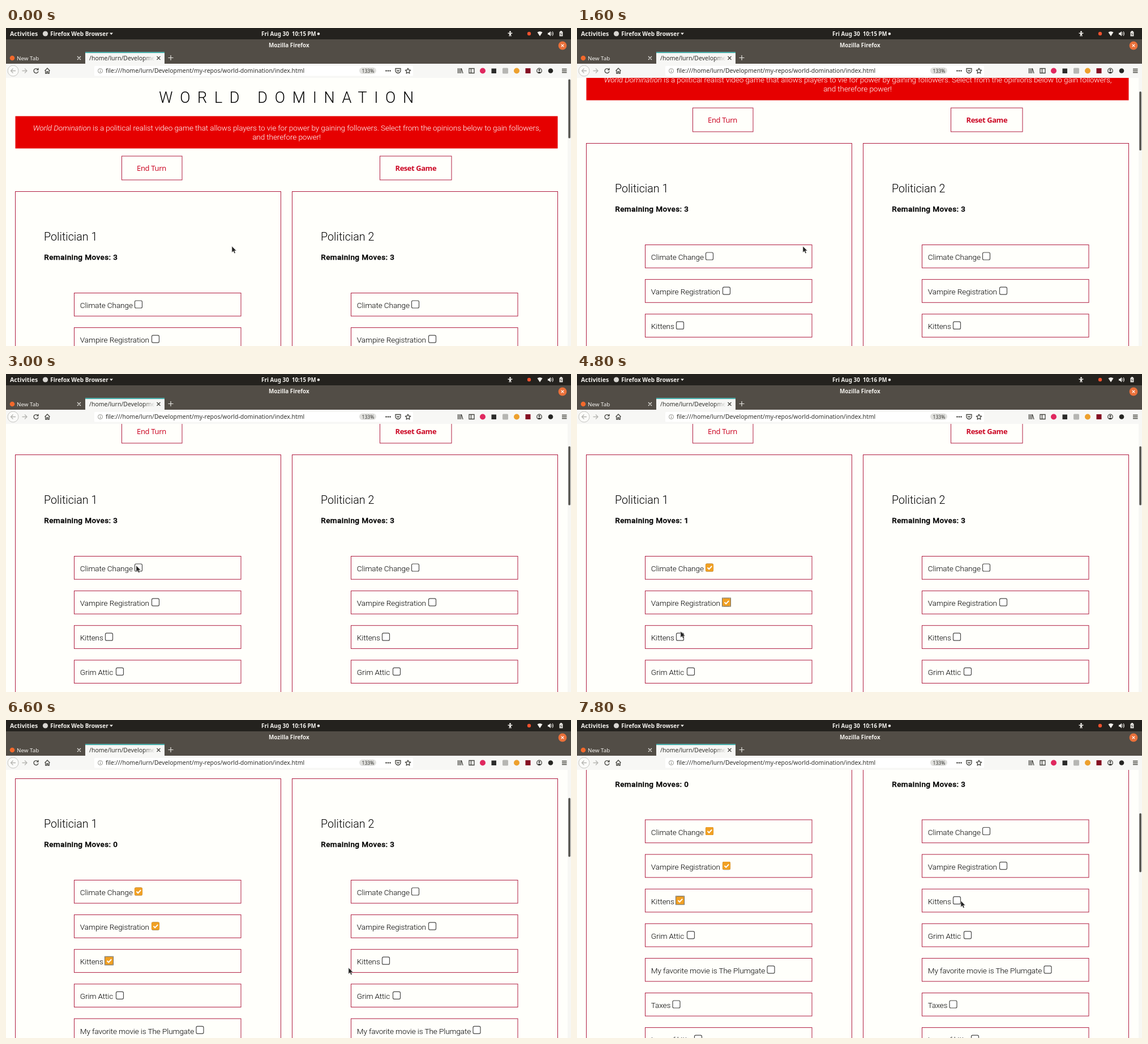
Recreate the animation shown at these times as an HTML page. Size 998 px wide and 561 px high, loop 8000 ms.

```html
<!DOCTYPE html>
<html lang="en">
<head>
<meta charset="utf-8">
<title>World Domination</title>
<style>
  @property --scroll { syntax: "<number>"; inherits: true; initial-value: 0; }
  @property --picked { syntax: "<number>"; inherits: true; initial-value: 0; }
  @property --minute { syntax: "<number>"; inherits: true; initial-value: 0; }

  html, body { margin: 0; width: 100%; height: 100%; overflow: hidden; background: #fffffb; }
  svg { display: block; animation: scroll 8s step-end infinite, state 8s step-end infinite; }
  text { white-space: pre; }

  #page { font-family: Roboto, sans-serif; font-size: 13.64px; font-weight: 300; letter-spacing: -.13px;
          fill: #000; transform: translateY(calc(var(--scroll) * -1px)); }
  #thumb { transform: translateY(calc(var(--scroll) * .2535px)); }
  #chrome { font: 10.5px "Noto Sans", "Open Sans", sans-serif; fill: #33332f; }
  .title { font-size: 27px; letter-spacing: 12.65px; }
  .name { font-size: 19.7px; letter-spacing: 0; }
  .moves { font-weight: 500; letter-spacing: .36px; stroke: #000; stroke-width: .3px; }
  .button { font: 500 13px "Noto Sans", "Open Sans", sans-serif; letter-spacing: -.35px; fill: #cc0a26; }
  .strong { font-weight: 700; letter-spacing: -.45px; }
  .frame { fill: none; stroke: #b01c40; }
  .light { fill: #f2f0ec; font-weight: 600; }
  .line { fill: none; stroke: #44443f; stroke-width: 1.3; }
  .faint { stroke: #b5b5b1; }

  /* --k is the number of picks at which an item appears */
  .from { opacity: calc(var(--picked) - var(--k) + 1); }
  .only { opacity: min(var(--picked) - var(--k) + 1, var(--k) + 1 - var(--picked)); }
  .before { opacity: calc(1 - var(--minute)); }
  .after { opacity: var(--minute); }

  #pointer { animation: pointer 8s step-end infinite; }

  @keyframes scroll {
    0% { --scroll: 0; }
    15% { --scroll: 1; }
    17.5% { --scroll: 36; }
    20% { --scroll: 85; }
    22.5% { --scroll: 124; }
    25% { --scroll: 140; }
    27.5% { --scroll: 146; }
    82.5% { --scroll: 185; }
    85% { --scroll: 228; }
    87.5% { --scroll: 262; }
    90% { --scroll: 282; }
    92.5%, 100% { --scroll: 291.5; }
  }
  @keyframes state {
    0% { --picked: 0; --minute: 0; }
    42.5% { --picked: 1; }
    47.5% { --minute: 1; }
    52.5% { --picked: 2; }
    65% { --picked: 3; }
    100% { --picked: 3; --minute: 1; }
  }
  @keyframes pointer {
    0% { transform: translate(399px, 385px); }
    27.5% { transform: translate(382px, 380px); }
    30% { transform: translate(330px, 364px); }
    32.5% { transform: translate(270px, 346px); }
    35% { transform: translate(236px, 339px); }
    37.5% { transform: translate(230px, 338px); }
    45% { transform: translate(236px, 350px); }
    47.5% { transform: translate(252px, 380px); }
    50% { transform: translate(261px, 398px); }
    55% { transform: translate(240px, 425px); }
    57.5% { transform: translate(192px, 450px); }
    60% { transform: translate(183px, 454px); }
    62.5% { transform: translate(181px, 458px); }
    72.5% { transform: translate(420px, 407px); }
    75% { transform: translate(605px, 437px); }
    85% { transform: translate(612px, 420px); }
    87.5% { transform: translate(632px, 384px); }
    90% { transform: translate(658px, 345px); }
    92.5% { transform: translate(674px, 322px); }
    95% { transform: translate(677px, 318px); }
    97.5%, 100% { transform: translate(678px, 319px); }
  }
</style>
</head>
<body>
<svg width="998" height="561" viewBox="0 0 998 561">
  <defs>
    <linearGradient id="fade">
      <stop stop-color="#f7f7f5" stop-opacity="0"/>
      <stop offset="1" stop-color="#f7f7f5"/>
    </linearGradient>
  </defs>
  <rect width="998" height="561" fill="#fffffb"/>

  <g id="page">
    <text class="title" x="270.3" y="131.5">WORLD DOMINATION</text>
    <rect x="16.5" y="155.5" width="958" height="57" fill="#e60000"/>
    <g fill="#fff" text-anchor="middle">
      <text x="496" y="181"><tspan font-style="italic">World Domination</tspan> is a political realist video game that allows players to vie for power by gaining followers. Select from the opinions below to gain followers,</text>
      <text x="495.5" y="197">and therefore power!</text>
    </g>
    <rect class="frame" x="204.5" y="226" width="106.5" height="42"/>
    <text class="button" x="231" y="252">End Turn</text>
    <rect class="frame" x="660.5" y="226" width="126.5" height="42"/>
    <text class="button strong" x="687.5" y="252">Reset Game</text>
  </g>

  <rect x="992" y="88" width="6" height="473" fill="#f7f7f4"/>
  <rect id="thumb" x="993.3" y="90.5" width="3.6" height="104" rx="1.6" fill="#55544f"/>

  <g id="chrome">
    <rect width="998" height="20" fill="#24221e"/>
    <rect y="20" width="998" height="43" fill="#524d46"/>
    <rect y="63" width="998" height="25" fill="#f7f7f5"/>

    <g class="light">
      <text x="7" y="13.6" font-size="10.6">Activities</text>
      <circle cx="69.5" cy="10" r="4.6" fill="#d8d6d2"/>
      <text x="78.3" y="13.6" font-size="10">Firefox Web Browser</text>
      <path d="M183 8.5h6l-3 3.6z"/>
      <text x="451" y="13.6" font-size="9.9">Fri Aug 30</text>
      <text class="before" x="505" y="13.6" font-size="9.7">10:15 PM</text>
      <text class="after" x="505" y="13.6" font-size="9.7">10:16 PM</text>
      <circle cx="552" cy="10.3" r="2.2"/>
      <circle cx="890.5" cy="6.7" r="1.5"/>
      <path d="M886.5 8.6h8v1.2l-2.6.5.6 4.5h-1.2l-.8-3-.8 3h-1.2l.6-4.5-2.6-.5z"/>
      <circle cx="924" cy="10" r="3.2" fill="#f0512e"/>
      <path d="M938.5 7.5q4.5-3 9 0l-4.5 7z"/>
      <path d="M957 8.5h2l3-2.7v8.6l-3-2.7h-2z"/>
      <path d="M963.5 7.5q2 2.5 0 5M965 6q3.2 4 0 8" fill="none" stroke="#f2f0ec"/>
      <path d="M979 5.3h3v1.2h1.4v8h-5.8v-8h1.4z"/>
      <path d="M981 8l-2 3h3l-2 2.5" fill="none" stroke="#24221e" stroke-width=".8"/>
      <text x="464" y="34" font-size="9.9">Mozilla Firefox</text>
    </g>
    <circle cx="983" cy="31" r="7.4" fill="#e9703a"/>
    <path d="M980.6 28.6l4.8 4.8m0-4.8l-4.8 4.8" stroke="#fff" stroke-width="1.2"/>

    <circle cx="11" cy="53" r="4.3" fill="#f2692c"/>
    <text x="19" y="56.7" font-size="9.8" fill="#f2f0ec">New Tab</text>
    <path d="M126 50l6 6m0-6l-6 6M286.5 52.5h9m-4.5-4.5v9" stroke="#e8e6e2" stroke-width="1.2"/>
    <rect x="140" y="42.5" width="140" height="20.5" fill="#f7f7f5"/>
    <rect x="140" y="42.5" width="140" height="1.6" fill="#25a9a5"/>
    <text x="147" y="56.7">/home/lurn/Developme</text>
    <rect x="243" y="46" width="20" height="16" fill="url(#fade)"/>
    <rect x="262.5" y="46" width="17" height="16" fill="#f7f7f5"/>
    <path class="line" d="M266.5 50l6 6m0-6l-6 6"/>

    <circle cx="12.5" cy="75.5" r="9.5" fill="#fbfbf9" stroke="#c4c4c0"/>
    <path class="line faint" d="M17 75.5H8.5m4-4l-4 4 4 4M28.5 75.5H37m-4-4l4 4-4 4"/>
    <path class="line" d="M56.3 73.2a4 4 0 1 0 .7 3.2M57 70.8v3h-3M68.5 75.5l4.5-4.5 4.5 4.5M69.8 75v5h2.2v-3h2v3h2.2v-5"/>

    <rect x="156" y="67" width="563" height="17.5" rx="1.5" fill="#fff"/>
    <circle cx="166.5" cy="75.5" r="4" fill="none" stroke="#85857f" stroke-width=".9"/>
    <path d="M166.5 73v1m0 1v3" stroke="#85857f"/>
    <text x="176" y="79.3">file:///home/lurn/Development/my-repos/world-domination/index.html</text>
    <rect x="624" y="69.5" width="30" height="11.5" rx="5.7" fill="#e1e1de"/>
    <text x="628.5" y="78.5" font-size="8.6">133%</text>
    <circle cx="671.5" cy="75.5" r="1.2"/>
    <circle cx="675" cy="75.5" r="1.2"/>
    <circle cx="678.5" cy="75.5" r="1.2"/>
    <path class="line" d="M688 71.5h9v4q-1 4-4.5 4t-4.5-4zM690.3 74.3l2.2 2 2.2-2"/>
    <path class="line" stroke-linejoin="round" d="M710 71l1.4 3 3.3.4-2.4 2.3.6 3.3-2.9-1.6-2.9 1.6.6-3.3-2.4-2.3 3.3-.4z"/>

    <path class="line" d="M798.5 71v9m2.5-9v9m2.5-9v9M804.5 71.5l2.5 8.5"/>
    <path class="line" d="M818 71.5h9v8h-9zM821.5 71.5v8"/>
    <circle cx="842" cy="75.5" r="5" fill="#e0285f"/>
    <rect x="857.5" y="71.5" width="8.5" height="8.5" fill="#2c2c2b"/>
    <rect x="877" y="70.5" width="10" height="10" rx="1.5" fill="#b6b6b3"/>
    <circle cx="902" cy="75.5" r="5" fill="#eda02d"/>
    <rect x="917.5" y="71" width="9" height="9" fill="#850e22"/>
    <circle class="line" cx="942" cy="75.5" r="4.3"/>
    <circle cx="942" cy="74" r="1.6"/>
    <path d="M939 78.3q3-3 6 0-3 2-6 0z"/>
    <circle cx="962" cy="75.5" r="4.3" fill="#252523"/>
    <path class="line" d="M982 72.5h8.5m-8.5 3h8.5m-8.5 3h8.5"/>
  </g>

  <path id="pointer" d="M0 0v11l2.6-2.4 1.7 4 1.9-.8-1.7-3.9h3.3z" fill="#222" stroke="#d8d8d4" stroke-width=".6"/>
</svg>

<script>
  // [label, checkbox left edge]
  const opinions = [
    ["Climate Change", 227.5], ["Vampire Registration", 257.5], ["Kittens", 175.5],
    ["Grim Attic", 194.5], ["My favorite movie is The Plumgate", 336],
    ["Taxes", 169], ["Love of kitty", 207.5]
  ];

  const tick = (x, y, k) => `
    <g class="from" style="--k:${k}">
      <rect x="${x - .5}" y="${y - .5}" width="14" height="14" rx="2.3" fill="#f0a024"/>
      <path d="M${x + 3} ${y + 6.5}l2.7 2.8 5-5.3" fill="none" stroke="#fff" stroke-width="2"/>
    </g>
    <rect class="only" style="--k:${k}" x="${x - 1}" y="${y - 1}" width="15" height="15"
      fill="none" stroke="#77705f"/>`;

  const row = ([label, x], i, pickable) => {
    const top = 467.5 + 61.1 * i;
    const boxTop = top + 13.5;
    return `
      <rect class="frame" x="120.5" y="${top}" width="294.5" height="40.7"/>
      <text x="130.8" y="${top + 26.6}">${label}</text>
      <rect x="${x}" y="${boxTop}" width="13" height="13" rx="2.3" fill="#fff" stroke="#4a4a48" stroke-width="1.2"/>
      ${pickable && i < 3 ? tick(x, boxTop, i + 1) : ""}`;
  };

  const moves = (left, attrs = "") =>
    `<text class="moves ${attrs && "only"}" ${attrs} x="67.3" y="409.2">Remaining Moves: ${left}</text>`;

  const column = (number, offset) => `
    <g transform="translate(${offset} 0)">
      <rect class="frame" x="16.5" y="288.5" width="469" height="1200"/>
      <text class="name" x="67" y="375.3">Politician ${number}</text>
      ${number === 1 ? [0, 1, 2, 3].map(k => moves(3 - k, `style="--k:${k}"`)).join("") : moves(3)}
      ${opinions.map((opinion, i) => row(opinion, i, number === 1)).join("")}
    </g>`;

  document.getElementById("page").insertAdjacentHTML("beforeend", column(1, 0) + column(2, 489));
</script>
</body>
</html>
```
